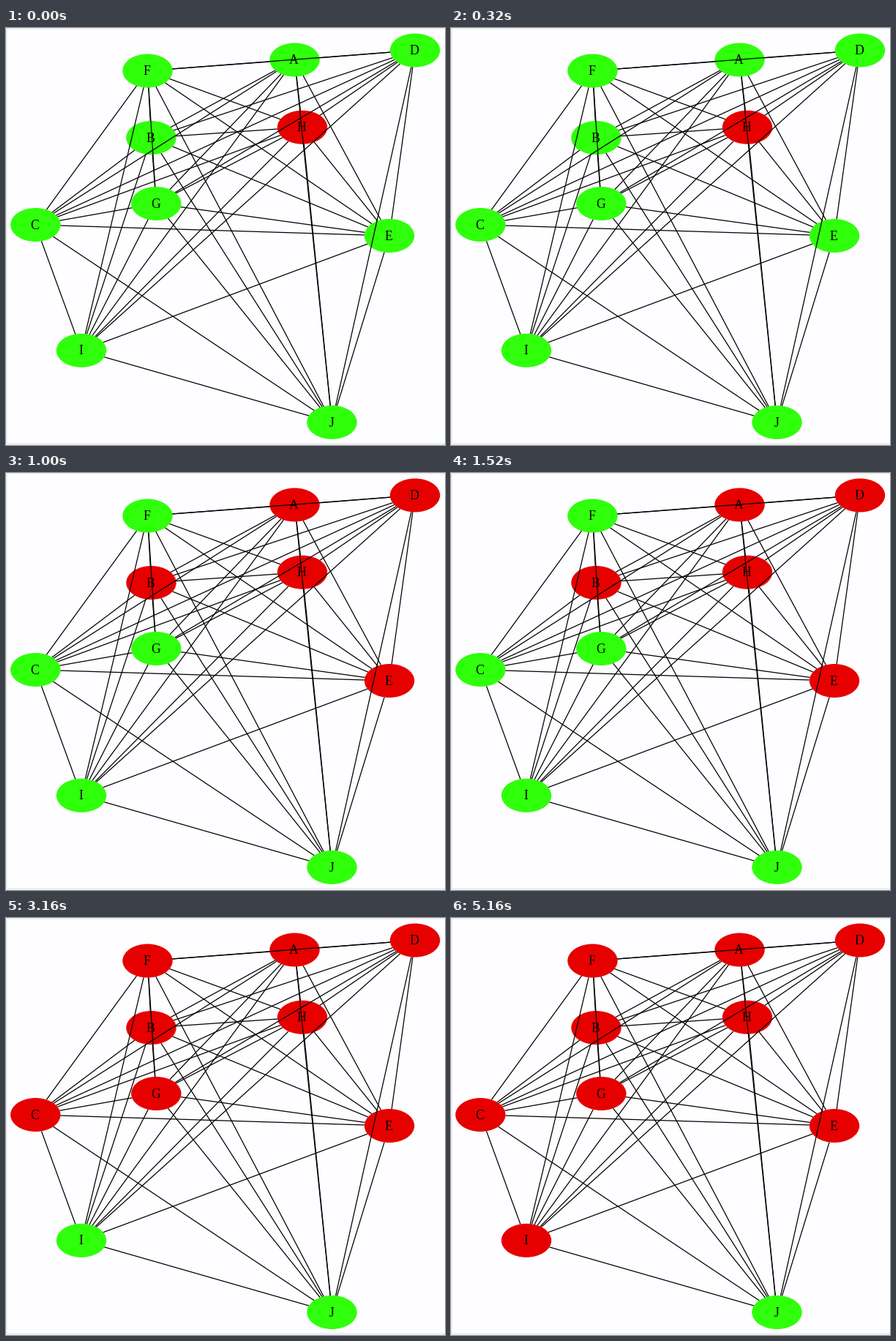
These frames come from a looping animation (600x570 px, 5.24 s). A matplotlib script:

```python
import math
from itertools import combinations

import matplotlib.pyplot as plt
from matplotlib.animation import FuncAnimation
from matplotlib.collections import LineCollection
from matplotlib.patches import Ellipse, Rectangle

W, H, DPI = 600, 570, 100
PX = 72 / DPI  # points per pixel
INTERVAL, LOOP = 40, 5240
RX, RY = 34.2, 23
GREEN, RED = "#2fff0a", "#e60000"

CENTERS = {
    "A": (394.5, 43.5), "B": (198.5, 150), "C": (40.3, 269), "D": (559, 30.5),
    "E": (524, 284), "F": (193.5, 58.5), "G": (205.3, 240), "H": (405, 135.7),
    "I": (103, 440.8), "J": (445.5, 539),
}
# Time in ms at which each group of nodes is infected.
WAVES = {0: "H", 1000: "ABDE", 1880: "FGC", 3560: "I"}
INFECTED_AT = {name: t for t, group in WAVES.items() for name in group}


def clipped_edge(p, q):
    """Segment between two nodes, cut off at their outlines."""
    dx, dy = q[0] - p[0], q[1] - p[1]
    k = 1 / math.hypot(dx / RX, dy / RY)
    return [(p[0] + k * dx, p[1] + k * dy), (q[0] - k * dx, q[1] - k * dy)]


fig = plt.figure(figsize=(W / DPI, H / DPI), dpi=DPI, facecolor="#efeff0")
ax = fig.add_axes([0, 0, 1, 1])
ax.set_xlim(0, W)
ax.set_ylim(H, 0)
ax.axis("off")
ax.add_patch(Rectangle((1.5, 2), W, 565, fc="#fefdff", lw=0, zorder=0))

nodes = {}
for name, (x, y) in CENTERS.items():
    nodes[name] = ax.add_patch(
        Ellipse((x, y), 2 * RX, 2 * RY, fc=GREEN, lw=0, zorder=1))
    ax.text(x - 0.8, y + 5.6, name, family="Liberation Serif",
            size=17.8 * PX, ha="center", va="baseline", zorder=2)

edges = [clipped_edge(p, q) for p, q in combinations(CENTERS.values(), 2)]
ax.add_collection(
    LineCollection(edges, colors="black", linewidths=1.25 * PX, zorder=3))


def update(frame):
    now = frame * INTERVAL
    for name, node in nodes.items():
        infected = now >= INFECTED_AT.get(name, math.inf)
        node.set_facecolor(RED if infected else GREEN)
    return list(nodes.values())


anim = FuncAnimation(fig, update, frames=LOOP // INTERVAL, interval=INTERVAL,
                     repeat=True, repeat_delay=0)
plt.show()
```
